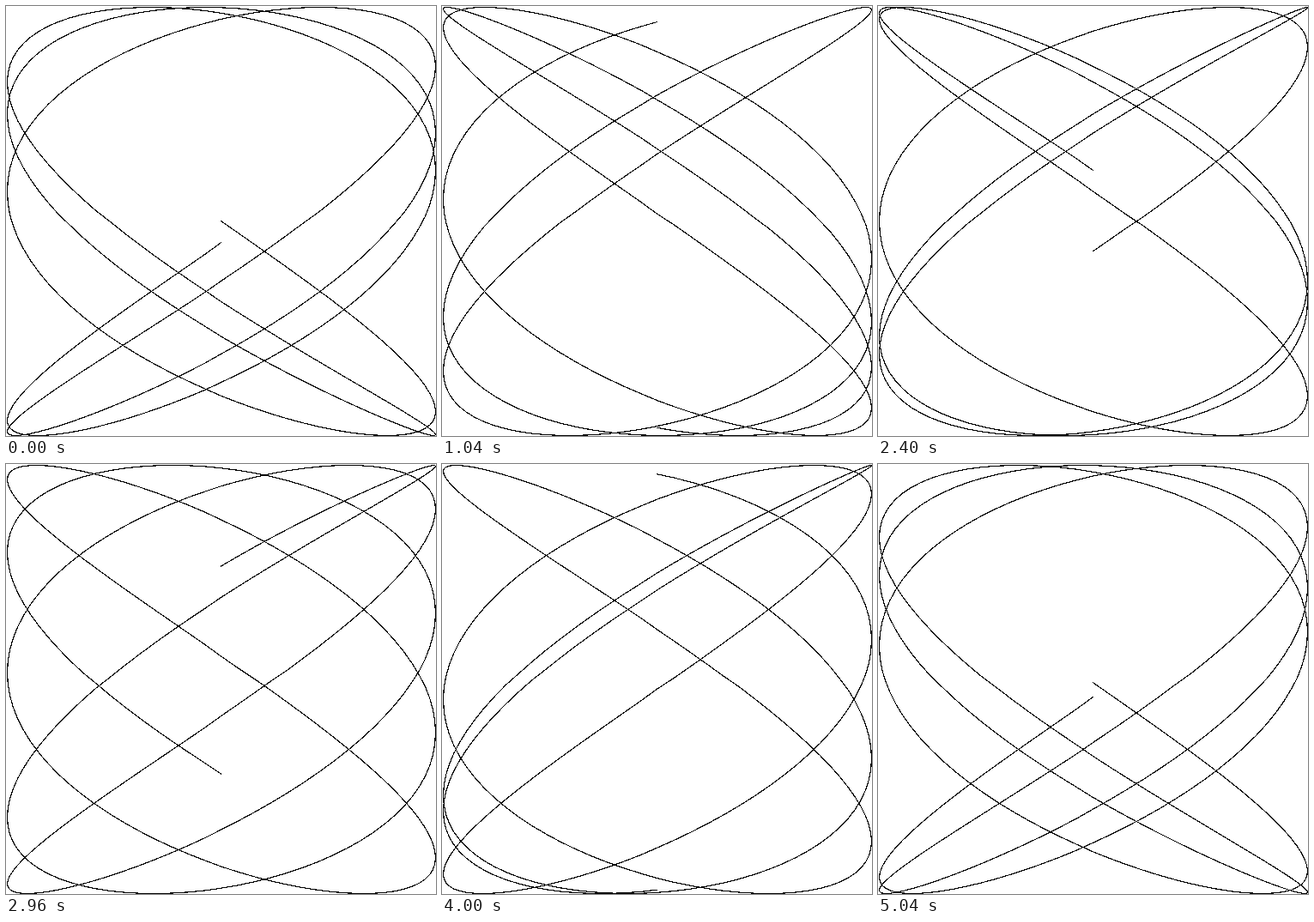
These frames come from a looping animation (501x501 px, 5120 ms). An HTML page without scripts:

```html
<!DOCTYPE html>
<html lang="en">
<head>
<meta charset="utf-8">
<title>Lissajous curve</title>
<style>
  @property --phase {
    syntax: "<number>";
    inherits: true;
    initial-value: 0;
  }

  html, body {
    margin: 0;
    width: 100%;
    height: 100%;
    overflow: hidden;
    background: #fff;
  }

  svg {
    display: block;
    --freq: 0.696785;
    animation: turn 5120ms steps(64, end) infinite;
  }

  @keyframes turn {
    from { --phase: 0; }
    to { --phase: 6.4; }
  }

  /* One short chord of x = sin t, y = sin(freq t + phase), from t to u.
     Negative coordinates sit one pixel nearer the centre. */
  path {
    --t: calc((var(--run) * 20 + var(--i)) * pi / 40);
    --u: calc((var(--run) * 20 + var(--i) + 1) * pi / 40);
    --xt: calc(250 * sin(var(--t)));
    --xu: calc(250 * sin(var(--u)));
    --yt: calc(250 * sin(var(--t) * var(--freq) + var(--phase)));
    --yu: calc(250 * sin(var(--u) * var(--freq) + var(--phase)));
    --x0: max(var(--xt), min(var(--xt) + 1, 0));
    --x1: max(var(--xu), min(var(--xu) + 1, 0));
    --y0: max(var(--yt), min(var(--yt) + 1, 0));
    --y1: max(var(--yu), min(var(--yu) + 1, 0));
    --dx: calc(var(--x1) - var(--x0));
    --dy: calc(var(--y1) - var(--y0));
    transform: matrix(
      var(--dx), var(--dy),
      calc(-1 * var(--dy)), var(--dx),
      calc(250.5 + var(--x0)), calc(250.5 + var(--y0)));
    fill: none;
    stroke: #000;
    stroke-width: 1.2px;
    stroke-linecap: round;
    vector-effect: non-scaling-stroke;
    shape-rendering: crispEdges;
  }
</style>
</head>
<body>
<svg width="501" height="501">
  <defs>
    <g id="run">
      <path d="M0 0H1" style="--i:0"/>
      <path d="M0 0H1" style="--i:1"/>
      <path d="M0 0H1" style="--i:2"/>
      <path d="M0 0H1" style="--i:3"/>
      <path d="M0 0H1" style="--i:4"/>
      <path d="M0 0H1" style="--i:5"/>
      <path d="M0 0H1" style="--i:6"/>
      <path d="M0 0H1" style="--i:7"/>
      <path d="M0 0H1" style="--i:8"/>
      <path d="M0 0H1" style="--i:9"/>
      <path d="M0 0H1" style="--i:10"/>
      <path d="M0 0H1" style="--i:11"/>
      <path d="M0 0H1" style="--i:12"/>
      <path d="M0 0H1" style="--i:13"/>
      <path d="M0 0H1" style="--i:14"/>
      <path d="M0 0H1" style="--i:15"/>
      <path d="M0 0H1" style="--i:16"/>
      <path d="M0 0H1" style="--i:17"/>
      <path d="M0 0H1" style="--i:18"/>
      <path d="M0 0H1" style="--i:19"/>
    </g>
  </defs>
  <!-- Twenty quarter turns of t make five full cycles -->
  <use href="#run" style="--run:0"/>
  <use href="#run" style="--run:1"/>
  <use href="#run" style="--run:2"/>
  <use href="#run" style="--run:3"/>
  <use href="#run" style="--run:4"/>
  <use href="#run" style="--run:5"/>
  <use href="#run" style="--run:6"/>
  <use href="#run" style="--run:7"/>
  <use href="#run" style="--run:8"/>
  <use href="#run" style="--run:9"/>
  <use href="#run" style="--run:10"/>
  <use href="#run" style="--run:11"/>
  <use href="#run" style="--run:12"/>
  <use href="#run" style="--run:13"/>
  <use href="#run" style="--run:14"/>
  <use href="#run" style="--run:15"/>
  <use href="#run" style="--run:16"/>
  <use href="#run" style="--run:17"/>
  <use href="#run" style="--run:18"/>
  <use href="#run" style="--run:19"/>
</svg>
</body>
</html>
```
